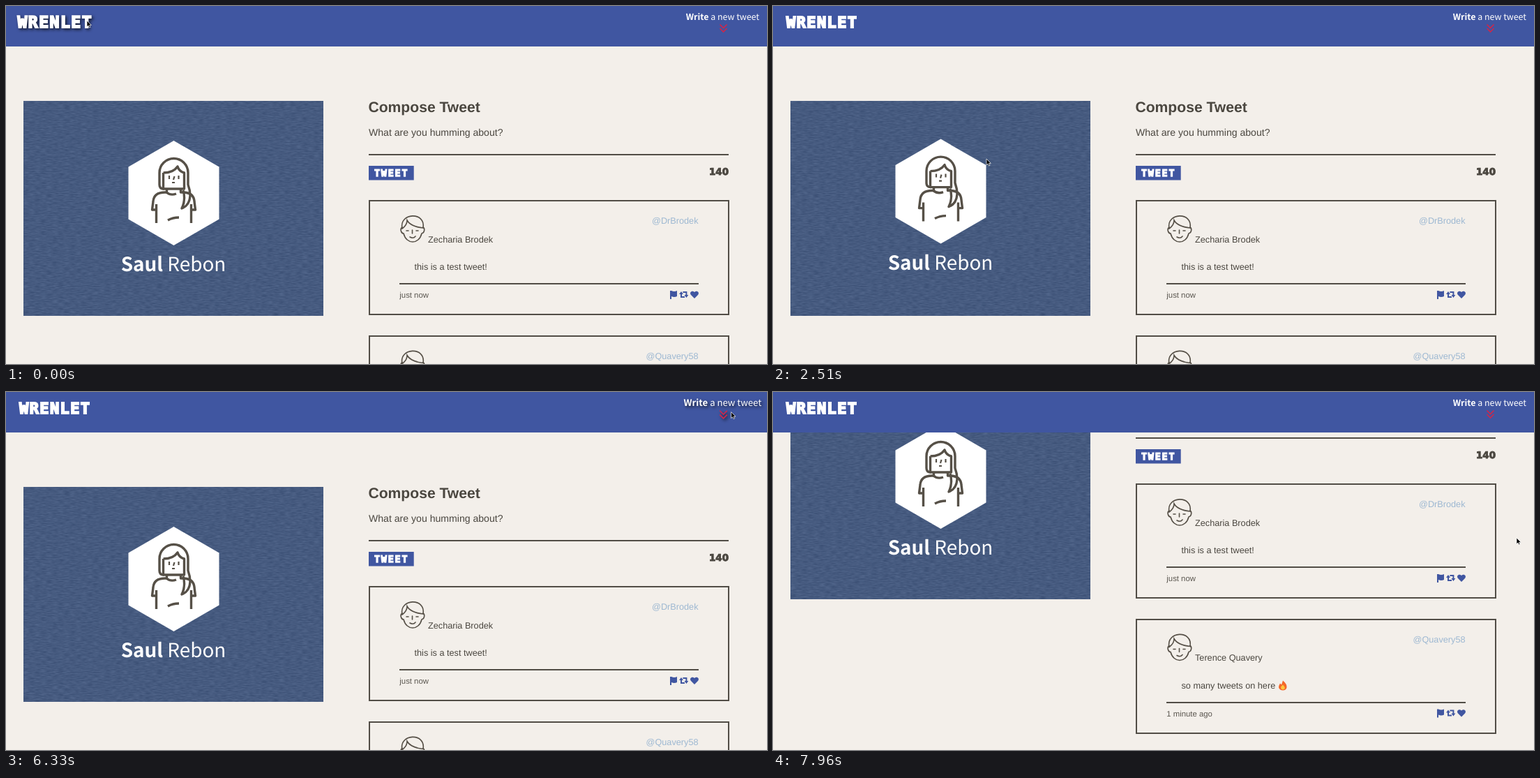
An HTML page for the animation above (8 s loop, 1091 px wide and 513 px high).

```html
<!DOCTYPE html>
<html lang="en">
<head>
<meta charset="utf-8">
<title>Compose page</title>
<style>
  html, body { margin: 0; width: 100%; height: 100%; overflow: hidden; background: #f3efea; }
  svg { display: block; width: 100%; height: 100%; }
  text { font-family: "Liberation Sans", Arial, sans-serif; font-size: 12.7px; fill: #4b4740; text-rendering: geometricPrecision; }
  .title { font-size: 21.1px; font-weight: 700; }
  .prompt { font-size: 14.08px; }
  .handle { fill: #9db8d2; text-anchor: end; }
  .age { font-size: 11.35px; fill: #5c5851; }
  .slab { font-family: "DejaVu Sans Mono", monospace; font-weight: 700; }
  .logo { font-size: 22px; letter-spacing: 1.4px; fill: #fff; stroke: #fff; stroke-width: 1.9px; }
  .button { font-size: 13.4px; letter-spacing: 1.8px; fill: #fff; stroke: #fff; stroke-width: 1.3px; }
  .count { font: 700 13.4px "DejaVu Sans", sans-serif; text-anchor: end; stroke: #4b4740; stroke-width: .9px; }
  .soft { font-family: "Noto Sans CJK JP", "Noto Sans CJK SC", "Open Sans", sans-serif; fill: #fff; font-weight: 300; }
  .soft tspan { font-weight: 700; }
  .person { font-size: 27.9px; text-anchor: middle; }
  .write { font-size: 12.4px; text-anchor: end; }
  .ink { fill: none; stroke: #514d46; stroke-width: 2; shape-rendering: crispEdges; }
  .sketch { fill: none; stroke: #565047; stroke-width: 3.4; stroke-linejoin: round; }
  .face { fill: none; stroke: #565047; stroke-width: 1.6; stroke-linecap: round; }
  .blue { fill: #4056a1; }
</style>
</head>
<body>
<svg viewBox="0 0 1091 513" preserveAspectRatio="none">
  <defs>
    <filter id="denim" x="0" y="0" width="1" height="1" color-interpolation-filters="sRGB">
      <feTurbulence type="fractalNoise" baseFrequency=".12 .6" numOctaves="2" seed="4"/>
      <feColorMatrix values=".13 0 0 0 .21  .13 0 0 0 .29  .13 0 0 0 .435  0 0 0 0 1"/>
    </filter>
    <g id="avatar" class="face">
      <path d="M568 317C564 320 567 326 570 326C574 342 592 342 596 326C600 325 601 319 598 317"/>
      <path d="M568 319C563 296 602 294 598 318Q580 316 575 307Q575 314 568 319Z"/>
      <path d="M574 322h3M588 322h3M582.500 321v5M579 331q5 3 8-1"/>
    </g>
    <g id="actions" class="blue">
      <path d="M952 408h2q4 2 8 0v8q-4 2-8 0v4h-2Z"/>
      <path id="turn" d="M965 413l3-4 3 4h-2v3h4v2h-6v-5Z"/>
      <use href="#turn" transform="rotate(180 971.700 413.500)"/>
      <path d="M987 419l-5-5c-3-4 2-7 5-4c3-3 8 0 5 4Z"/>
    </g>
  </defs>

  <g id="page">
    <rect x="25" y="136" width="430" height="308" filter="url(#denim)"/>
    <g id="profile">
      <path d="M240.500 193l65 37.500v75l-65 37.500l-65-37.500v-75Z" fill="#fff"/>
      <g class="sketch">
        <path d="M226 262Q220 262 220 256V239a20.500 20.500 0 0 1 41 0V256Q264 264 264 272Q263 286 252 290Q258 278 254 264"/>
        <path d="M225.500 239V262H255.500V239Q248 237 246 230Q240 239 225.500 239"/>
        <path id="arm" d="M230.500 262V267Q212 266 211 280L209.500 292H217M215.500 284V311"/>
        <use href="#arm" transform="translate(481) scale(-1 1)"/>
        <path d="M230 267Q236 272 244 269M232 307Q239 303 248 303"/>
        <path d="M234 243v5M247.500 243v5M241.500 244l-1.500 5M238 253h4" stroke-width="2.200"/>
      </g>
      <text class="soft person" x="240" y="380"><tspan>Saul</tspan> Rebon</text>
    </g>

    <text class="title" x="519.500" y="151.500">Compose Tweet</text>
    <text class="prompt" x="520" y="186">What are you humming about?</text>
    <path class="ink" d="M520 213H1036"/>
    <rect class="blue" x="520" y="229" width="64.700" height="20.500"/>
    <text class="slab button" x="528" y="243.500">TWEET</text>
    <text class="count" x="1036" y="242">140</text>
    <g id="cards"></g>
  </g>

  <rect class="blue" width="1091" height="58"/>
  <g id="logo"><text class="slab logo" x="19" y="30.500">WRENLET</text></g>
  <g id="write">
    <text class="soft write" x="1080" y="20"><tspan>Write</tspan> a new tweet</text>
    <path d="M1023.500 26.500l5 5 5-5m-10 5.500l5 5 5-5" fill="none" stroke="#d0264a" stroke-width="1.600"/>
  </g>
  <path id="cursor" d="M0 0V9l2-2 1.500 3 1.500-.7-1.400-2.900H6.400Z" stroke="#fff" stroke-width=".7"/>
</svg>
<script>
  const LOOP = 8000, STEP = 147.2, LEAD = 8, LAST = 54, SCROLL = 147;
  const byId = id => document.getElementById(id);
  const smooth = f => f * f * (3 - 2 * f);

  const flame = `
    <path d="M731 367q6 5 5.500 10q-1 4-5.500 4t-6-4q0-3 2-6l2 2Z" fill="#f4672a"/>
    <path d="M731 373q3 3 3 5q-3 4-6 0q0-3 3-5Z" fill="#fdc63f"/>`;

  const card = ({ name, handle, body, age, extra = '' }, i) => `
    <g transform="translate(0 ${i * 193.5})">
      <rect class="ink" x="521" y="279" width="514.500" height="163"/>
      <use href="#avatar"/>
      <text x="605" y="338.500">${name}</text>
      <text class="handle" x="992.500" y="312">${handle}</text>
      <text x="585.500" y="378">${body}</text>${extra}
      <path class="ink" d="M564 398H992.500"/>
      <text class="age" x="564.300" y="418">${age}</text>
      <use href="#actions"/>
    </g>`;

  byId('cards').innerHTML = [
    { name: 'Zecharia Brodek', handle: '@DrBrodek', body: 'this is a test tweet!', age: 'just now' },
    { name: 'Terence Quavery', handle: '@Quavery58', body: 'so many tweets on here', age: '1 minute ago', extra: flame }
  ].map(card).join('');

  // Places where the pointer turns or rests
  const stops = [
    { at: 0, x: 116, y: 21 },
    { at: 6, x: 242.5, y: 52 },
    { at: 10, x: 342, y: 190 },
    { at: 17, x: 306, y: 219 },
    { at: 24, x: 454, y: 177 },
    { at: 32, x: 578, y: 242 },
    { at: 34, x: 507, y: 208 },
    { at: 40, x: 1042, y: 20 },
    { at: 47, x: 1036, y: 42 },
    { at: 52, x: 1064.5, y: 201 },
    { at: LAST, x: 1066, y: 209 }
  ];

  function pointerAt(step) {
    const i = Math.max(1, stops.findIndex(s => s.at >= step));
    const a = stops[i - 1], b = stops[i];
    const f = smooth((step - a.at) / (b.at - a.at));
    return [a.x + (b.x - a.x) * f, a.y + (b.y - a.y) * f];
  }

  // A one-second bounce: three hops, each lower and shorter
  function bounceAt(step) {
    let p = (step - 10.4) * STEP / 1000 - .2;
    for (let hop = 0, span = .35, height = 26.4; hop < 3; hop++, span *= .75, height *= .4) {
      if (p > 0 && p < span) return -height * Math.sin(Math.PI * p / span);
      p -= span;
    }
    return 0;
  }

  function hover(id, on, scale, cx, cy) {
    const el = byId(id);
    el.setAttribute('transform', on ? `translate(${cx} ${cy}) scale(${scale}) translate(${-cx} ${-cy})` : '');
    el.style.filter = on ? 'drop-shadow(2px 2px 2px rgba(0,0,0,.7))' : '';
  }

  const move = (id, x, y) => byId(id).setAttribute('transform', `translate(${x} ${y})`);

  const start = performance.now();
  let shown = -1;
  function draw(now) {
    const t = Math.max(0, now - start) % LOOP;
    const step = Math.min(LAST, Math.floor((t + LEAD) / STEP));
    if (step !== shown) {
      shown = step;
      move('cursor', ...pointerAt(step));
      move('profile', 0, bounceAt(step));
      move('page', 0, -SCROLL * smooth(Math.max(0, step - LAST + 2) / 2));
      hover('logo', step < 3, 1.05, 70, 23);
      hover('write', step >= 40 && step < 49, 1.06, 1028, 22);
    }
    requestAnimationFrame(draw);
  }
  draw(start);
</script>
</body>
</html>
```
